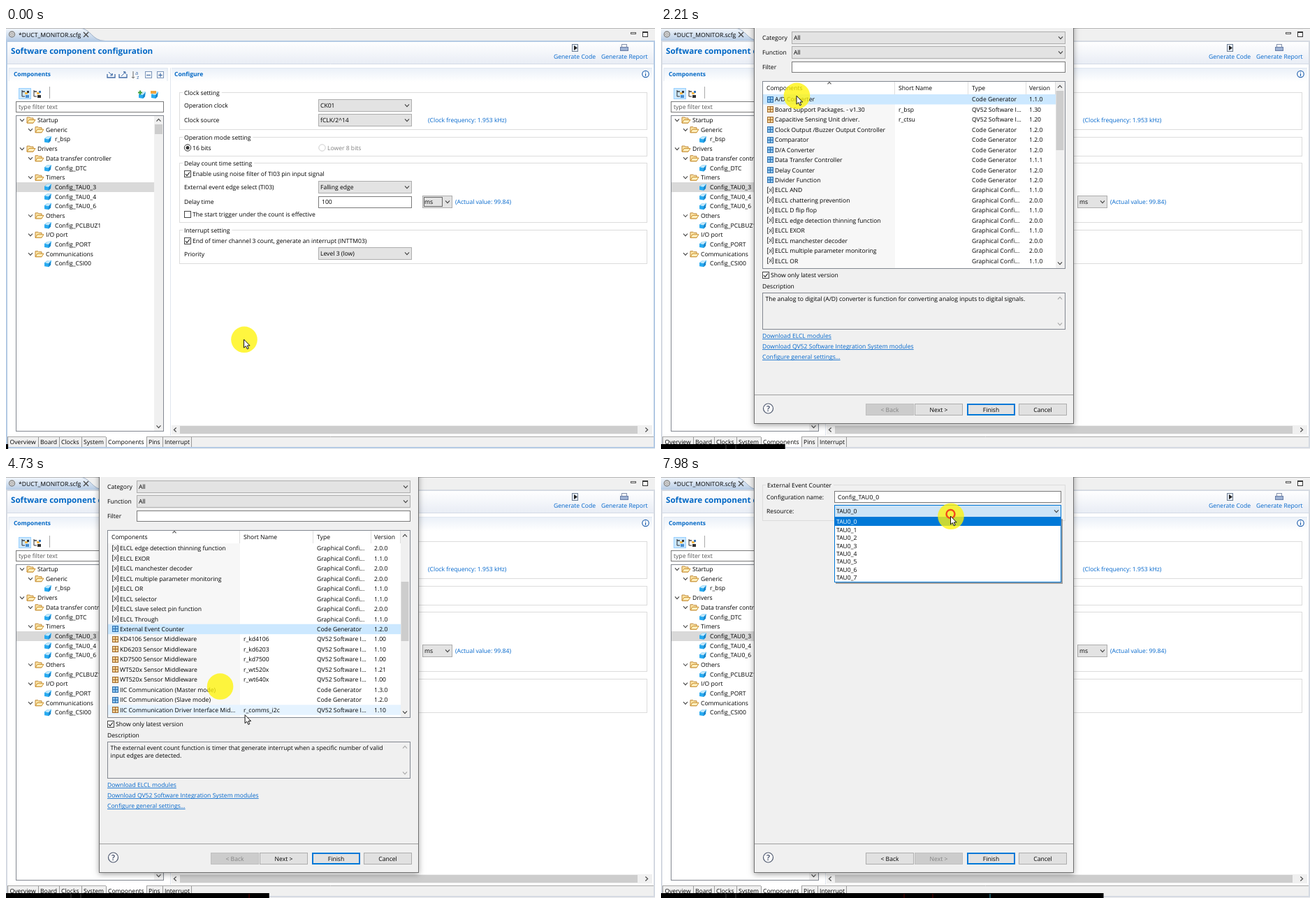
Animation of 929x603 px, one loop 8000 ms. Source, as an HTML page with a canvas:

```html
<!DOCTYPE html>
<html lang="en">
<head>
<meta charset="utf-8">
<title>Component configuration</title>
<style>
html, body { margin: 0; width: 100%; height: 100%; overflow: hidden; background: #fff; }
canvas { display: block; }
</style>
</head>
<body>
<canvas id="stage" width="929" height="603"></canvas>
<script>
const ctx = document.getElementById('stage').getContext('2d');
const LOOP = 8000, OPEN = 2000, PICK = 4400, NEXT = 6200, DROP = 7800;
const BLUE = '#0066cc', ACCENT = '#0078d7', INK = '#000';
const ROW_H = 14.46, ROW_TOP = 95;

// ---------- drawing helpers ----------
function box(x, y, w, h, fill, stroke, lineWidth = 1) {
  if (fill) { ctx.fillStyle = fill; ctx.fillRect(x, y, w, h); }
  if (stroke) {
    ctx.strokeStyle = stroke; ctx.lineWidth = lineWidth;
    ctx.strokeRect(x + lineWidth / 2, y + lineWidth / 2, w - lineWidth, h - lineWidth);
  }
}
function path(points, stroke, lineWidth = 1, fill) {
  ctx.beginPath();
  for (let i = 0; i < points.length; i += 2) ctx.lineTo(points[i], points[i + 1]);
  if (fill) { ctx.closePath(); ctx.fillStyle = fill; ctx.fill(); }
  if (stroke) { ctx.strokeStyle = stroke; ctx.lineWidth = lineWidth; ctx.stroke(); }
}
function circle(x, y, r, fill, stroke, lineWidth = 1) {
  ctx.beginPath(); ctx.arc(x, y, r, 0, 7);
  if (fill) { ctx.fillStyle = fill; ctx.fill(); }
  if (stroke) { ctx.strokeStyle = stroke; ctx.lineWidth = lineWidth; ctx.stroke(); }
}
function text(s, x, midY, color = INK, size = 8.6, weight = 400, align = 'left') {
  ctx.font = `${weight} ${size}px "Open Sans", "Noto Sans", sans-serif`;
  ctx.textRendering = 'geometricPrecision';
  ctx.textAlign = align;
  ctx.fillStyle = color;
  ctx.fillText(s, x, midY + size * .36);
}
function fade(y0, y1, from, to) {
  const g = ctx.createLinearGradient(0, y0, 0, y1);
  g.addColorStop(0, from); g.addColorStop(1, to);
  return g;
}
function chevron(x, y, dir = 'down', color = '#444', r = 3) {
  const s = r * .55;
  const shape = {
    down: [-r, -s, 0, s, r, -s], up: [-r, s, 0, -s, r, s],
    left: [s, -r, -s, 0, s, r], right: [-s, -r, s, 0, -s, r]
  }[dir];
  path(shape.map((v, i) => v + (i % 2 ? y : x)), color, 1.1);
}
function combo(x, y, w, h, label, fill = '#e3e3e3', stroke = '#adadad') {
  box(x, y, w, h, fill, stroke);
  text(label, x + 3, y + h / 2);
  chevron(x + w - 7, y + h / 2);
}
function check(x, y, on, label) {
  box(x, y, 10, 10, '#fff', '#444');
  if (on) path([x + 2, y + 5, x + 4, y + 7.5, x + 8, y + 2.5], '#222', 1.2);
  text(label, x + 12, y + 5);
}
function group(x, y, w, h, label, bg) {
  box(x, y, w, h, null, '#dcdcdc');
  ctx.font = '8.6px "Open Sans", "Noto Sans", sans-serif';
  box(x + 5, y - 1, ctx.measureText(label).width + 5, 3, bg);
  text(label, x + 7, y + .5);
}
function button(x, label, state) {
  const fill = { off: '#cccccc', hot: '#e5f1fb' }[state] || '#e1e1e1';
  const stroke = { off: '#bfbfbf', hot: ACCENT, main: ACCENT }[state] || '#adadad';
  box(x, 538, 69, 17, fill, stroke, state === 'main' ? 2 : 1);
  text(label, x + 34.5, 546.5, state === 'off' ? '#838383' : INK, 8.6, 400, 'center');
}

// ---------- icons ----------
function folder(x, y) {
  path([x, y - 4, x + 4, y - 4, x + 5, y - 3, x + 9, y - 3, x + 9, y + 4, x, y + 4, x, y - 4], '#c08a3a', 1, '#fbe3a4');
  path([x, y + 4, x + 3, y - .5, x + 12, y - .5, x + 9, y + 4, x, y + 4], '#c98f2e', 1, '#fff0c0');
}
function cube(x, y) {
  path([x, y - 1, x + 4, y - 4, x + 10, y - 4.5, x + 9, y + 2, x + 6, y + 5, x, y + 4], null, 1, '#27aaf0');
  path([x + 1, y - 1, x + 4, y - 4, x + 10, y - 4.5, x + 6, y], null, 1, '#c4e9fb');
  path([x + 6, y, x + 9, y - 3, x + 9, y + 2, x + 6, y + 5], null, 1, '#1a86cc');
}
function rowIcon(kind, y) {
  if (kind === 'g') {
    box(152, y - 4, 9, 9, '#f4f4f4');
    path([154, y - 4, 152.5, y - 4, 152.5, y + 4.5, 154, y + 4.5], '#444');
    path([159, y - 4, 160.5, y - 4, 160.5, y + 4.5, 159, y + 4.5], '#444');
    path([154.5, y - 2, 157, y, 154.5, y + 3], '#444');
    path([158, y - 3, 158, y + 3], '#666');
    return;
  }
  const [dark, light] = kind === 'c' ? ['#2f6fad', '#8cc4ee'] : ['#a0692b', '#f2cf95'];
  box(152, y - 4, 9, 9, light, dark);
  path([156.5, y - 4, 156.5, y + 5], dark);
  path([152, y + .5, 161, y + .5], dark);
}
function panelIcon(x, kind) {
  const c = '#3f6aa5';
  if (kind < 2) {
    path([x, 66, x, 71, x + 11, 71, x + 11, 66], c, 1.3);
    path(kind ? [x + 3, 69, x + 9, 63, x + 6, 63, x + 9, 63, x + 9, 66] : [x + 2, 63, x + 7, 68, x + 7, 65, x + 7, 68, x + 4, 68], c);
  } else if (kind === 2) {
    path([x + 2, 62, x + 2, 72, x, 70, x + 2, 72, x + 4, 70], '#666');
    text('a', x + 5, 64, c, 7.5); text('z', x + 7, 70, c, 7.5);
  } else {
    box(x, 62, 10, 10, '#fff', '#7893b8');
    path([x + 2, 67.5, x + 8, 67.5], c, 1.2);
    if (kind === 4) path([x + 5, 64.5, x + 5, 70.5], c, 1.2);
  }
}

// ---------- main window ----------
const tree = [
  [0, 'Startup'], [1, 'Generic'], [2, 'r_bsp'], [0, 'Drivers'],
  [1, 'Data transfer controller'], [2, 'Config_DTC'], [1, 'Timers'],
  [2, 'Config_TAU0_3'], [2, 'Config_TAU0_4'], [2, 'Config_TAU0_6'],
  [1, 'Others'], [2, 'Config_PCLBUZ1'], [1, 'I/O port'], [2, 'Config_PORT'],
  [1, 'Communications'], [2, 'Config_CSI00']
];
const pageTabs = [['Overview', 2], ['Board', 46], ['Clocks', 76], ['System', 108],
  ['Components', 143], ['Pins', 201], ['Interrupt', 224], ['', 265]];

function drawHeader() {
  box(0, 0, 929, 603, '#fff');
  box(0, 0, 929, 19, '#f0f0f0');
  ctx.beginPath();
  ctx.moveTo(0, 0); ctx.lineTo(104, 0);
  ctx.bezierCurveTo(122, 0, 122, 18.5, 142, 18.5);
  ctx.lineTo(0, 18.5);
  ctx.fillStyle = fade(0, 19, '#f4f8fd', '#b4cae4'); ctx.fill();
  ctx.strokeStyle = '#9eb0c8'; ctx.lineWidth = 1; ctx.stroke();
  path([0, .5, 929, .5], '#b5b5b5');
  circle(8.5, 9, 4, '#ddd', '#888', 1.5); circle(8.5, 9, 1.5, '#fff', '#888');
  text('*DUCT_MONITOR.scfg', 18, 9.5);
  path([111, 6, 118, 13], '#444', 1.2); path([118, 6, 111, 13], '#444', 1.2);
  box(894, 6, 8, 3, '#fff', '#555');
  box(911, 5, 8, 8, '#fff', '#333'); box(911, 5, 8, 2, '#333');

  box(1, 19, 927, 32, fade(19, 51, '#ffffff', '#e9edf5'));
  path([1, 51.5, 928, 51.5], '#d3dae6');
  text('Software component configuration', 7, 33, '#0067c5', 11.65, 700);
  box(810, 23, 9, 11, '#e8eef6', '#6d7d92');
  path([813, 25, 818, 28.5, 813, 32], null, 1, '#222');
  text('Generate Code', 784, 41, BLUE);
  box(881, 23, 8, 5, '#fff', '#8290ab'); box(879, 27, 12, 6, '#9eb2d4', '#687da6');
  text('Generate Report', 852, 41, BLUE);
}

function drawComponents() {
  box(4, 57, 228, 20, fade(57, 77, '#eaf0f8', '#ffffff'));
  path([4, 76, 4, 57.5, 231, 57.5, 231, 76], '#e0e7f1');
  text('Components', 11, 66, '#0067c5', 8.4, 700);
  [145, 162, 180, 199, 216].forEach(panelIcon);

  box(18, 86, 18, 16, '#cce8ff', '#99d1ff');
  [23, 40].forEach((x, i) => {
    path([x, 89, x, 98, x + 4, 98], '#333'); path([x, 91, x + 4, 91], '#333', 1.4);
    box(x + 4, 92, 4, 3, '#f4b848'); box(x + 5, 96, 5, 4, i ? '#333' : '#4b8fd0');
    box(x + 7, 90, 3, 3, i ? '#3877bb' : '#333');
  });
  path([62.5, 84, 62.5, 101], '#aaa');
  cube(190, 96); path([189, 92.5, 195, 92.5], '#3f9d3a', 2); path([192, 89.5, 192, 95.5], '#3f9d3a', 2);
  cube(208, 96); box(207, 90, 8, 4, '#efa540');

  box(14, 105, 212, 16, '#fff', '#7a7a7a');
  text('type filter text', 18, 113, '#555');
  box(14, 125, 212, 453, '#fff', '#828790');
  box(212, 126, 13, 451, '#f0f0f0');
  box(213, 138, 11, 14, '#cdcdcd');
  chevron(218.5, 132, 'up'); chevron(218.5, 571);
  box(15, 221, 197, 14, '#d9d9d9');
  tree.forEach(([depth, label], i) => {
    const y = 132 + i * 13.69, x = 18 + depth * 12;
    if (depth < 2) { chevron(x + 5, y, 'down'); folder(x + 12, y); text(label, x + 27, y); }
    else { cube(55, y); text(label, 70, y); }
  });
}

function drawConfigure(modal) {
  path([235.5, 57, 235.5, 584], '#dfe5ee');
  box(237, 57, 688, 20, fade(57, 77, '#eaf0f8', '#ffffff'));
  path([237, 57.5, 925, 57.5], '#e0e7f1');
  text('Configure', 241, 66, '#0067c5', 8.5, 700);
  circle(915.5, 66, 4.7, '#fff', '#2765b0', 1.2);
  path([915.5, 65, 915.5, 69], '#2765b0', 1.3); box(915, 63, 1, 1, '#2765b0');

  group(248, 92, 670, 54, 'Clock setting', '#fff');
  text('Operation clock', 255, 111); combo(447, 102, 134, 18, 'CK01');
  text('Clock source', 255, 132); combo(447, 123, 134, 18, 'fCLK/2^14');
  text('(Clock frequency: 1.953 kHz)', 604, 132, BLUE);

  group(248, 156, 670, 28, 'Operation mode setting', '#fff');
  circle(260, 171.5, 4.7, '#fff', '#333'); circle(260, 171.5, 2.5, '#333');
  text('16 bits', 267, 171.5);
  circle(452.5, 171.5, 4.7, '#fff', '#ccc'); text('Lower 8 bits', 460, 171.5, '#808080');

  group(248, 193, 670, 86, 'Delay count time setting', '#fff');
  check(255, 204, true, 'Enable using noise filter of TI03 pin input signal');
  text('External event edge select (TI03)', 255, 228); combo(447, 219, 134, 18, 'Falling edge');
  text('Delay time', 255, 249);
  box(447, 241, 134, 17, '#fff', '#7a7a7a'); text('100', 452, 249);
  combo(596, 240, 43, 18, 'ms');
  if (!modal) box(598, 242, 27, 14, null, '#666');
  text('(Actual value: 99.84)', 643, 249, BLUE);
  check(255, 262, false, 'The start trigger under the count is effective');

  group(248, 289, 670, 49, 'Interrupt setting', '#fff');
  check(255, 300, true, 'End of timer channel 3 count, generate an interrupt (INTTM03)');
  text('Priority', 255, 324); combo(447, 314, 134, 18, 'Level 3 (low)');

  box(237, 569, 688, 13, '#f0f0f0'); box(249, 570, 655, 11, '#cdcdcd');
  chevron(242, 575.5, 'left'); chevron(917, 575.5, 'right');
}

function drawFooter(modal) {
  box(0, 585, 929, 18, '#f0f0f0');
  path([1, 585.5, 928, 585.5], '#a8a8a8');
  pageTabs.forEach(([label, x], i) => {
    if (label === 'Components') box(x, 585, 58, 15, '#fff');
    path([x + .5, 586, x + .5, 600], '#999');
    text(label, x + (i ? 3 : 3.5), 593);
  });
  path([2, 600.5, 265, 600.5], '#b0b0b0');
  // The active editor has a blue frame, which greys out behind the dialog
  box(0, 18, 929, 584, null, modal ? '#d5dae2' : '#b4cae4', 2);
}

// ---------- dialog ----------
const typeNames = { c: 'Code Generator', r: 'QV52 Software I...', g: 'Graphical Confi...' };
const rows = `A/D Converter||c|1.1.0
Board Support Packages. - v1.30|r_bsp|r|1.30
Capacitive Sensing Unit driver.|r_ctsu|r|1.20
Clock Output /Buzzer Output Controller||c|1.2.0
Comparator||c|1.2.0
D/A Converter||c|1.2.0
Data Transfer Controller||c|1.1.1
Delay Counter||c|1.2.0
Divider Function||c|1.2.0
ELCL AND||g|1.1.0
ELCL chattering prevention||g|2.0.0
ELCL D flip flop||g|1.1.0
ELCL edge detection thinning function||g|2.0.0
ELCL EXOR||g|1.1.0
ELCL manchester decoder||g|2.0.0
ELCL multiple parameter monitoring||g|2.0.0
ELCL OR||g|1.1.0
ELCL selector||g|1.1.0
ELCL slave select pin function||g|2.0.0
ELCL Through||g|1.1.0
External Event Counter||c|1.2.0
KD4106 Sensor Middleware|r_kd4106|r|1.00
KD6203 Sensor Middleware|r_kd6203|r|1.10
KD7500 Sensor Middleware|r_kd7500|r|1.00
WT520x Sensor Middleware|r_wt520x|r|1.21
WT520x Sensor Middleware|r_wt640x|r|1.00
IIC Communication (Master mode)||c|1.3.0
IIC Communication (Slave mode)||c|1.2.0
IIC Communication Driver Interface Mid...|r_comms_i2c|r|1.10`.split('\n').map(s => s.split('|'));

function drawTable(t, cursor) {
  // Four wheel notches of three rows each
  const scroll = 3 * Math.max(0, Math.min(4, Math.floor((t - 2960) / 80)));
  const selected = t < PICK ? 0 : 20;
  const inTable = cursor.x > 146 && cursor.x < 565 && cursor.y > ROW_TOP && cursor.y < 343;
  const hover = inTable ? scroll + Math.floor((cursor.y - ROW_TOP) / ROW_H) : -1;

  box(145, 76, 434, 269, '#fff', '#828790');
  box(146, 95, 189, 249, '#f7f7f7');
  [334.5, 439.5, 522.5, 564.5].forEach(x => path([x, 77, x, 95], '#dedede'));
  [['Components', 151], ['Short Name', 340], ['Type', 445], ['Version', 527]].forEach(([s, x]) => text(s, x, 86));
  chevron(241, 79, 'up', '#555', 2.5);
  rows.slice(scroll, scroll + 17).forEach(([name, short, kind, version], i) => {
    const top = ROW_TOP + i * ROW_H, mid = top + 7.2, index = scroll + i;
    if (index === selected) box(146, top, 419, ROW_H, '#cce8ff');
    else if (index === hover) box(146, top, 419, ROW_H, '#e5f3ff');
    rowIcon(kind, Math.floor(mid));
    text(name, 163, mid); text(short, 340, mid);
    text(typeNames[kind], 445, mid); text(version, 527, mid);
  });
  box(565, 77, 13, 267, '#f0f0f0');
  box(565.5, 90 + scroll * 5, 11, 85, '#cdcdcd');
  chevron(571, 84, 'up'); chevron(571, 337);
}

function link(s, y) {
  text(s, 145, y, BLUE);
  path([145, y + 4.5, 145 + ctx.measureText(s).width, y + 4.5], BLUE, .8);
}

function drawSelectPage(t, cursor) {
  text('Category', 145, 14); combo(187, 5, 392, 18, 'All');
  text('Function', 145, 35); combo(187, 26, 392, 18, 'All');
  text('Filter', 145, 56); box(187, 48, 392, 16, '#fff', '#7a7a7a');
  drawTable(t, cursor);
  check(145, 349, true, 'Show only latest version');
  text('Description', 145, 370);
  box(145, 379, 434, 53, '#f0f0f0', '#828790');
  chevron(571, 387, 'up', '#aaa'); chevron(571, 424, 'down', '#aaa');
  const lines = t < PICK
    ? ['The analog to digital (A/D) converter is function for converting analog inputs to digital signals.']
    : ['The external event count function is timer that generate interrupt when a specific number of valid', 'input edges are detected.'];
  lines.forEach((s, i) => text(s, 149.5, 387.5 + i * 11.5));
  link('Download ELCL modules', 441);
  link('Download QV52 Software Integration System modules', 456);
  link('Configure general settings...', 471);
}

function drawNamePage(t) {
  const open = t >= DROP;
  group(145, 11, 434, 52, 'External Event Counter', '#f0f0f0');
  text('Configuration name:', 151, 29);
  box(248, 20, 325, 17, '#fff', open ? '#7a7a7a' : ACCENT);
  text('Config_TAU0_0', 253, 28.5);
  const caretOn = (t - 5890) % 1060 < 530;
  if (!open && caretOn) path([253.5, 23, 253.5, 35], '#000');
  text('Resource:', 151, 49);
  combo(248, 40, 325, 18, 'TAU0_0', open ? '#cce4f7' : '#e3e3e3', open ? ACCENT : '#adadad');
  if (!open) return;
  box(250, 60, 325, 93, 'rgba(0,0,0,.35)');
  box(248, 57, 325, 94, '#fff', ACCENT);
  box(249, 58, 323, 12, ACCENT);
  for (let i = 0; i < 8; i++) text('TAU0_' + i, 251, 64.3 + i * 11.4, i ? INK : '#fff');
}

function drawDialog(t, cursor) {
  ctx.save();
  ctx.globalAlpha = Math.min(1, (t - OPEN) / 120);
  ctx.shadowColor = 'rgba(0,0,0,.35)'; ctx.shadowBlur = 8; ctx.shadowOffsetY = 2;
  box(133, -10, 458, 577, '#f0f0f0');
  ctx.shadowColor = 'transparent';
  box(133, -10, 458, 577, null, '#707070');
  const second = t >= NEXT;
  if (second) drawNamePage(t); else drawSelectPage(t, cursor);
  path([134, 525.5, 590, 525.5], '#a0a0a0');
  circle(153.5, 545, 7, '#fafafa', '#505a70', 1.2);
  text('?', 153.5, 545, '#34405e', 11, 600, 'center');
  const overNext = cursor.x > 363 && cursor.x < 432 && cursor.y > 538 && cursor.y < 555;
  button(293, '< Back', second ? '' : 'off');
  button(363, 'Next >', second ? 'off' : overNext ? 'hot' : '');
  button(438, 'Finish', 'main');
  button(512, 'Cancel', '');
  ctx.restore();
}

// ---------- pointer ----------
const keys = [
  [0, 340.5, 446], [200, 340.5, 446], [500, 300, 434], [840, 234, 397], [1100, 208, 240],
  [1250, 198, 150], [1410, 195, 120], [1600, 194, 97], [2200, 194, 97], [2600, 214, 180],
  [2850, 219, 210], [3050, 219, 210], [3500, 230, 217], [4500, 230, 217], [4970, 460, 510],
  [5500, 411, 547], [6400, 411, 547], [6650, 424, 430], [6900, 428, 200], [7050, 421, 122],
  [7350, 415, 58], [7600, 414.5, 56], [8000, 414.5, 56]
];
function slope(i, axis) {
  const a = keys[i - 1], b = keys[i], c = keys[i + 1];
  if (!a || !c || (b[axis] - a[axis]) * (c[axis] - b[axis]) <= 0) return 0;
  return (c[axis] - a[axis]) / (c[0] - a[0]);
}
function pointerAt(t) {
  t = Math.max(0, t);
  const i = keys.findIndex(k => k[0] > t) - 1;
  const a = keys[i], b = keys[i + 1], d = b[0] - a[0], u = (t - a[0]) / d;
  const curve = n => a[n] * (1 + 2 * u) * (1 - u) ** 2 + b[n] * u * u * (3 - 2 * u)
    + d * (slope(i, n) * u * (1 - u) ** 2 - slope(i + 1, n) * u * u * (1 - u));
  return { x: curve(1), y: curve(2) };
}
function drawPointer(t, { x, y }) {
  const glow = pointerAt(t - 50);
  circle(glow.x + .5, glow.y + .3, 18.8, 'rgba(255,244,10,.78)');
  for (const click of [1720, PICK - 80, NEXT - 100, DROP - 20])
    if (t >= click && t < click + 240) circle(x, y - 3, 6, null, '#f2481c', 2.4);
  path([0, 0, 0, 12, 2.8, 9.5, 4.8, 13.8, 6.7, 13, 4.9, 8.9, 8.6, 8.9, 0, 0].map((v, i) => v + (i % 2 ? y : x)), '#111', 1, '#fff');
}

function drawBar(t) {
  const width = 3 + t * .079;
  box(0, 596, width, 7, '#000');
  for (const [x, color] of [[92, '#222'], [106, '#222'], [347, '#300'], [388, '#300'], [470, '#1c5560']])
    if (x + 2 < width) box(x, 597, 2, 6, color);
}

function frame(now) {
  const t = now % LOOP, cursor = pointerAt(t), modal = t >= OPEN;
  drawHeader();
  drawComponents();
  drawConfigure(modal);
  drawFooter(modal);
  if (modal) drawDialog(t, cursor);
  drawPointer(t, cursor);
  drawBar(t);
  requestAnimationFrame(frame);
}
requestAnimationFrame(frame);
</script>
</body>
</html>
```
